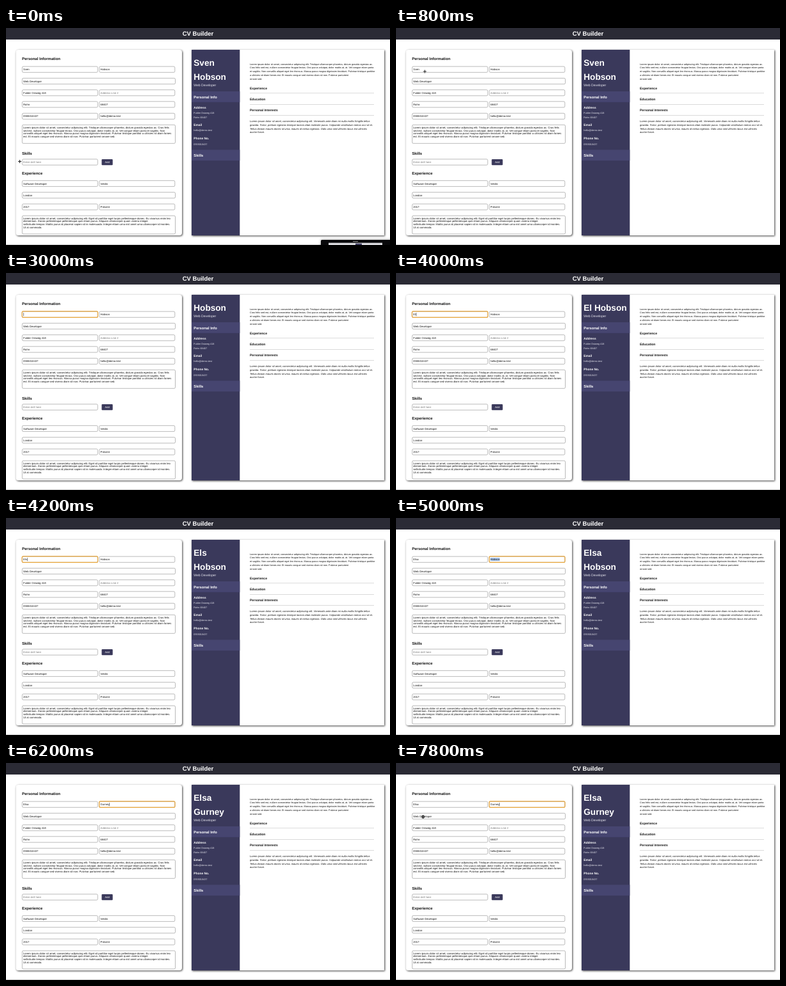
An HTML page that plays this animation: 600 by 339 pixels, repeating every 8 s.

```html
<!DOCTYPE html>
<html lang="en">
<head>
<meta charset="utf-8">
<title>CV Builder</title>
<style>
html, body { margin: 0; width: 100%; height: 100%; overflow: hidden; background: #fff; }
svg { display: block; width: 600px; height: 339px; }
text { font-family: "Liberation Sans", Arial, sans-serif; text-rendering: geometricPrecision; white-space: pre; }
.b { font-weight: bold; }
.i { font-style: italic; }
.panel { filter: drop-shadow(1px 1.5px 1.8px rgba(0,0,0,.75)); }
</style>
</head>
<body>
<svg id="stage" viewBox="0 0 600 339"></svg>
<script>
const stage = document.getElementById("stage");
const INK = "#111", NAVY = "#3a395b", BAR = "#464570";

function add(tag, attrs, parent = stage) {
  const el = document.createElementNS("http://www.w3.org/2000/svg", tag);
  for (const k in attrs) el.setAttribute(k, attrs[k]);
  return parent.appendChild(el);
}
const rect = (x, y, width, height, fill, more, parent) =>
  add("rect", { x, y, width, height, fill, ...more }, parent);
function text(str, x, y, size, fill = INK, cls = "", parent = stage) {
  const el = add("text", { x, y, "font-size": size, fill, class: cls }, parent);
  el.textContent = str;
  return el;
}
const lines = (list, x, y, size, step, cls) =>
  list.forEach((s, i) => text(s, x, y + i * step, size, INK, cls));
const box = (x, y, w, h) =>
  rect(x, y, w, h, "#fff", { rx: 1.8, stroke: "#8c8c8c", "stroke-width": .6 });
function field(str, col, mid, wide, fill) {
  const x = col ? 145.8 : 25.3;
  box(x, mid - 4.6, wide ? 239.2 : 118, 9.2);
  return text(str, x + 1.8, mid + 1.5, 4.2, fill);
}

// Page and header
rect(0, 0, 600, 339, "#fff");
rect(0, 0, 600, 18, "#2b2b35");
text("CV Builder", 300, 12.4, 9.5, "#fff", "b").setAttribute("text-anchor", "middle");
rect(0, 338, 600, 1, "#c9c9c9");

// Form
rect(15.5, 34, 259.5, 290, "#fff", { rx: 4, class: "panel" });
text("Personal Information", 25, 50.2, 6, INK, "b");
const firstField = field("", 0, 64.7);
const lastField = field("", 1, 64.7);
field("Web Developer", 0, 83, true);
field("Fulder Ostweg 418", 0, 101.2);
field("Address Line 2", 1, 101.2, false, "#777");
field("Rohn", 0, 119.4);
field("68407", 1, 119.4);
field("0555010437", 0, 137.8);
field("hello@demo.test", 1, 137.8);
box(25.3, 151.3, 239.2, 29);
lines([
  "Lorem ipsum dolor sit amet, consectetur adipiscing elit. Tristique ullamcorper pharetra, dictum gravida egestas ac. Cras felis",
  "sed est, nullam consectetur feugiat lectus. Orci purus volutpat, dolor mattis at, at. Vel congue etiam porta et sagittis. Non",
  "convallis aliquet eget leo rhoncus. Massa purus magna dignissim tincidunt. Pulvinar tristique porttitor a ultricies sit diam fames",
  "est. Et mauris congue sed viverra diam sit non. Pulvinar parturient ornare sed."
], 27, 157, 4.18, 4.7);

text("Skills", 25, 197.7, 6, INK, "b");
field("Enter skill here", 0, 209.5, false, "#777");
rect(149.5, 205, 17.2, 9.2, NAVY, { rx: 1 });
text("Add", 158.1, 211, 4.1, "#fff").setAttribute("text-anchor", "middle");

text("Experience", 25, 228.9, 6, INK, "b");
field("Software Developer", 0, 243);
field("Veldin", 1, 243);
field("London", 0, 261.2, true);
field("2017", 0, 279.5);
field("Present", 1, 279.5);
box(25.3, 293.3, 239.2, 28.5);
lines([
  "Lorem ipsum dolor sit amet, consectetur adipiscing elit. Eget sit porttitor eget turpis pellentesque donec. Eu vivamus enim leo",
  "elementum. Donec pellentesque pellentesque quis etiam purus. Aliquam ullamcorper quam viverra integer",
  "sollicitudin tempor. Mattis purus id placerat sapien sit in malesuada. Integer etiam urna nisl amet urna ullamcorper id montes.",
  "Ut at commodo."
], 27, 298.6, 4.18, 4.7);

// Preview
rect(290, 34, 301, 290, "#fff", { class: "panel" });
rect(290, 34, 75.3, 290, NAVY);
const nameTop = text("", 293.3, 58.5, 13.6, "#fff", "b");
const nameBottom = text("", 293.3, 80.7, 13.6, "#fff", "b");
const side = add("g", {});
const sideText = (str, y, size, cls) => text(str, 293.3, y, size, cls ? "#fff" : "#e6e6ee", cls, side);
sideText("Web Developer", 91.4, 5.1);
for (const [str, y] of [["Personal Info", 99], ["Skills", 190.3]]) {
  rect(290, y, 75.3, 16.8, BAR, {}, side);
  sideText(str, y + 10.6, 5.75, "b");
}
sideText("Address", 125.7, 4.85, "b");
sideText("Fulder Ostweg 418", 133.8, 3.8);
sideText("Rohn 68407", 140.5, 3.8);
sideText("Email", 153.2, 4.85, "b");
sideText("hello@demo.test", 161.4, 3.8);
sideText("Phone No.", 174.2, 4.85, "b");
sideText("0555010437", 182.5, 3.8);

lines([
  "Lorem ipsum dolor sit amet, consectetur adipiscing elit. Tristique ullamcorper pharetra, dictum gravida egestas ac.",
  "Cras felis sed est, nullam consectetur feugiat lectus. Orci purus volutpat, dolor mattis at, at. Vel congue etiam porta",
  "et sagittis. Non convallis aliquet eget leo rhoncus. Massa purus magna dignissim tincidunt. Pulvinar tristique porttitor",
  "a ultricies sit diam fames est. Et mauris congue sed viverra diam sit non. Pulvinar parturient",
  "ornare sed."
], 381, 57.7, 3.82, 5.7);
[["Experience", 95.6], ["Education", 113], ["Personal Interests", 130.4]].forEach(([str, y]) => {
  text(str, 381, y, 5.05, INK, "b");
  rect(381, y + 6, 194, .5, "#b5b5b5");
});
lines([
  "Lorem ipsum dolor sit amet, consectetur adipiscing elit. Venenatis ante diam mi nulla mollis fringilla tellus",
  "gravida. Tortor, pretium egestas tristique lacinia vitae molestie purus. Vulputate vestibulum metus orci sit et.",
  "Tellus dictum mauris donec id urna, mauris id metus egestas. Odio urna sed ultricies lacus est ultricies",
  "auctor fusce."
], 381, 147.4, 4.06, 5.65, "i");

// Moving parts
const ring = rect(0, 59.8, 118.4, 9.6, "none", { rx: 1.6, stroke: "#e9a63a", "stroke-width": 1.2 });
const mark = rect(147.6, 62, 0, 5.2, "#a9c6ee");
lastField.before(mark);
const caret = rect(0, 62.2, .5, 5, "#111");

const thumb = add("g", {});
rect(492, 331, 120, 20, "#08080a", { rx: 1.5, style: "filter:drop-shadow(0 0 2px rgba(0,0,0,.4))" }, thumb);
rect(504, 335.6, 84, 10, "#d8d8dc", {}, thumb);
rect(546, 336.6, 10, 10, NAVY, {}, thumb);
rect(542, 333, 8, .8, "#aaa", {}, thumb);

const cross = add("g", {});
const arms = "M-2.5 0H2.5M0 -2.5V2.5";
add("path", { d: arms, stroke: "#fff", "stroke-width": 2 }, cross);
add("path", { d: arms, stroke: "#222", "stroke-width": 1.1 }, cross);
const grip = add("circle", { r: 2.2, fill: "#555", stroke: "#222", "stroke-width": .7 }, cross);
const beam = add("path", { d: "M44.5 64.5H46.5M45.5 64.5V70.5M44.5 70.5H46.5", stroke: "#222", "stroke-width": .6 });

// [time, first name, last name, focused column]
const edits = [
  [0, "Sven", "Hobson", -1], [1400, "Sven", "Hobson", 0],
  [2400, "Sve", "Hobson", 0], [2600, "Sv", "Hobson", 0], [2800, "S", "Hobson", 0], [3000, "", "Hobson", 0],
  [3800, "E", "Hobson", 0], [4000, "El", "Hobson", 0], [4200, "Els", "Hobson", 0], [4400, "Elsa", "Hobson", 0],
  [5000, "Elsa", "Hobson", 1],
  [5800, "Elsa", "Gu", 1], [6000, "Elsa", "Gurn", 1], [6200, "Elsa", "Gurney", 1]
];
// [time, x, y]; no position means hidden
const pointer = [
  [0, 21.5, 208.5], [200, 30.5, 140], [400, 37, 85], [600, 45, 72.6], [800, 45, 68], [1000, 46, 67.3],
  [1200], [7400, 40, 74.5], [7600, 39.5, 81.8], [7800, 42.3, 84]
];
const at = (list, t) => list.filter(e => e[0] <= t).pop();
const show = (el, on) => el.setAttribute("visibility", on ? "visible" : "hidden");

function draw(t) {
  const [, first, last, focus] = at(edits, t);
  firstField.textContent = first;
  lastField.textContent = last;

  // The name breaks in two when it is wider than the sidebar
  nameTop.textContent = (first + " " + last).trim();
  const wraps = nameTop.getComputedTextLength() > 70;
  if (wraps) nameTop.textContent = first;
  nameBottom.textContent = wraps ? last : "";
  side.setAttribute("transform", `translate(0 ${wraps ? 0 : -22})`);

  const selected = t >= 5000 && t < 5800;
  const active = focus ? lastField : firstField;
  const end = +active.getAttribute("x") + active.getComputedTextLength();
  ring.setAttribute("x", focus ? 145.6 : 25.1);
  caret.setAttribute("x", end + .2);
  mark.setAttribute("width", selected ? end - 147.6 : 0);
  show(ring, focus >= 0);
  show(caret, focus >= 0 && !selected);

  const [, x, y] = at(pointer, t);
  show(cross, x !== undefined);
  if (x !== undefined) cross.setAttribute("transform", `translate(${x} ${y})`);
  grip.setAttribute("opacity", t >= 7800 ? 1 : 0);
  show(beam, t >= 1200 && t < 2000);

  show(thumb, t < 600);
  thumb.setAttribute("transform", `translate(${t < 400 ? 0 : 50} 0)`);
}

const start = performance.now();
function tick() {
  draw((performance.now() - start) % 8000);
  requestAnimationFrame(tick);
}
tick();
</script>
</body>
</html>
```
